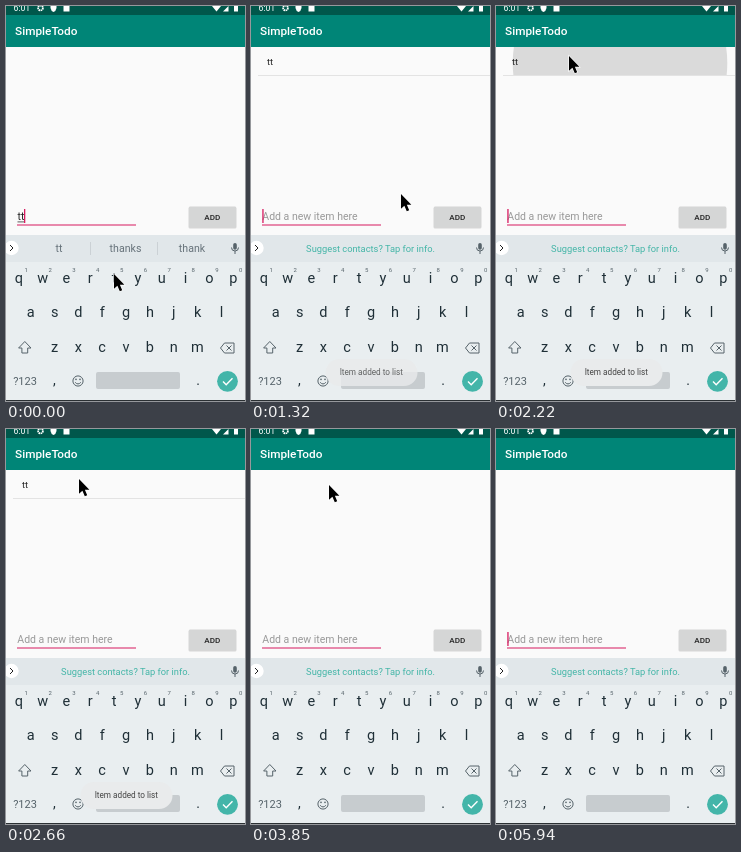
These frames come from a looping animation (239 px wide and 395 px high, 6240 ms). An HTML page:

```html
<!DOCTYPE html>
<html lang="en">
<head>
<meta charset="utf-8">
<title>Todo list</title>
<style>
  html, body { margin: 0; width: 100%; height: 100%; overflow: hidden; background: #fafafa; }
  svg { display: block; width: 100%; height: 100%; font-family: Roboto, sans-serif; }
  .mid { text-anchor: middle; }
  .line { fill: none; stroke: #56636a; stroke-width: 1; }
</style>
</head>
<body>
<svg viewBox="0 0 239 395">
  <defs>
    <clipPath id="rowClip"><rect x="7" y="41" width="232" height="29"/></clipPath>
  </defs>
  <rect width="239" height="395" fill="#fafafa"/>

  <!-- list row -->
  <g id="row">
    <circle id="ripple" cx="124" cy="57" fill="#dadada" clip-path="url(#rowClip)"/>
    <path d="M7 69.5H239" stroke="#e3e3e3"/>
    <text x="16" y="59" font-size="9.3" fill="#212121">tt</text>
  </g>

  <!-- status and title bars -->
  <rect y="9" width="239" height="32" fill="#008577"/>
  <rect width="239" height="9" fill="#00574b"/>
  <g fill="#fff">
    <text x="7.5" y="5" font-size="8.7">6:01</text>
    <circle cx="34.5" cy="2" r="2.4" fill="none" stroke="#fff" stroke-width="1.8" stroke-dasharray="1.4 .5"/>
    <path d="M44.5 0H50.5V2Q50 5 47.5 6Q45 5 44.5 2Z"/>
    <path d="M57.5 0H63.5V5.5H57.5Z"/>
    <path d="M206 0H215L210.5 5.5Z"/>
    <path d="M217 5.5L222.5 0V5.5Z"/>
    <path d="M228 0H232V5.5H228Z"/>
    <text x="9" y="29.2" font-size="11.8" font-weight="500">SimpleTodo</text>
  </g>

  <!-- input and button -->
  <path d="M11 219H130" stroke="#d81b60" stroke-width="1.2"/>
  <g id="typed">
    <text x="11.5" y="214.3" font-size="10.5" fill="#212121">tt</text>
    <path d="M11.5 215.9H18.3" stroke="#333" stroke-width=".8"/>
  </g>
  <text id="hint" x="11.3" y="214.3" font-size="10.5" fill="#999">Add a new item here</text>
  <rect id="caret" y="203" width="1.3" height="14" fill="#d81b60"/>
  <rect x="182.5" y="201" width="48" height="21.6" rx="1.5" opacity=".14"/>
  <rect id="button" x="183" y="200.6" width="47" height="21" rx="1"/>
  <text class="mid" x="206.3" y="214" font-size="8.1" font-weight="500" fill="#212121">ADD</text>

  <!-- keyboard -->
  <rect y="229" width="239" height="166" fill="#e9eef0"/>
  <rect y="229" width="239" height="27" fill="#e1e7ea"/>
  <circle cx="5.5" cy="242" r="7.2" fill="#fff"/>
  <path d="M4 239L7 242L4 245" class="line" style="stroke:#222"/>
  <g id="words" class="mid" font-size="10.6" fill="#66727a">
    <text x="53" y="246">tt</text>
    <text x="119.5" y="246">thanks</text>
    <text x="186" y="246">thank</text>
    <path d="M84.5 236V249M151.5 236V249" stroke="#cbd1d5"/>
  </g>
  <text id="suggest" class="mid" x="119.5" y="245.8" font-size="9.3" fill="#43b5a7">Suggest contacts? Tap for info.</text>
  <rect x="227.2" y="237" width="3.6" height="6.8" rx="1.8" fill="#56636a"/>
  <path d="M225.5 241.5A3.5 3.5 0 0 0 232.5 241.5M229 245V248" class="line"/>
  <g id="keys" class="mid" fill="#1f2f37"></g>
  <path d="M18.8 335.5L25 342H21.7V347H15.9V342H12.6Z" class="line"/>
  <path d="M214.5 342L218.5 337H228V347H218.5ZM220.5 339.5L225.5 344.5M225.5 339.5L220.5 344.5" class="line"/>
  <circle cx="72" cy="375" r="5.1" class="line"/>
  <path d="M69.2 376.3Q72 379.6 74.8 376.3" class="line"/>
  <g fill="#56636a"><circle cx="70" cy="373.4" r=".8"/><circle cx="74" cy="373.4" r=".8"/></g>
  <rect x="90" y="366" width="84" height="17" rx="2" fill="#c7cccf"/>
  <circle cx="221.5" cy="375.3" r="10.4" fill="#43b5a9"/>
  <path d="M217 375.5L220.2 378.7L226.5 372.3" fill="none" stroke="#fff" stroke-width="1.4"/>
  <rect y="394" width="239" height="1" fill="#2b3033"/>

  <g id="toast">
    <rect x="74.5" y="353" width="92" height="27" rx="13.5" fill="#e9ebec"/>
    <text class="mid" x="120.3" y="369.3" font-size="8.2" fill="#444">Item added to list</text>
  </g>

  <path id="mouse" d="M0 0V14.8L3.4 11.7L5.8 17.3L8.2 16.2L5.9 10.8H10.4Z" fill="#000" stroke="#fff" stroke-width="1.2" paint-order="stroke"/>
</svg>
<script>
const LOOP = 6240, TICK = 148.5, LEAD = 20;
const ADDED = 1000, REMOVED = 3850, MOUSE_GONE = 4400;
const $ = id => document.getElementById(id);
const clamp = v => Math.min(1, Math.max(0, v));
const ease = v => v * v * (3 - 2 * v);
const set = (id, attributes) => {
  for (const name in attributes) $(id).setAttribute(name, attributes[name]);
};
const show = (id, on) => set(id, { visibility: on ? "visible" : "hidden" });

// Keyboard letters
const PITCH = 23.83;
const label = (text, x, y, size) => `<text x="${x}" y="${y}" font-size="${size}">${text}</text>`;
const letters = (chars, x, y, size = 14.5) =>
  [...chars].map((c, i) => label(c, x + i * PITCH, y, size)).join("");
$("keys").innerHTML =
  letters("qwertyuiop", 12.8, 277) + letters("asdfghjkl", 24.8, 311.1) + letters("zxcvbnm", 48.5, 346.2) +
  `<g fill="#56636a">${letters("1234567890", 20.3, 266, 6)}${label("?123", 19, 379, 11)}</g>` +
  label(",", 48.5, 379, 14) + label(".", 192, 379, 14);

const home = { x: 108, y: 268 };
const moves = [
  { from: 200, to: 740, x: 208, y: 207 },   // to the button
  { from: 1050, to: 1330, x: 150, y: 188 }, // and up to the new row
  { from: 1330, to: 1930, x: 73, y: 50 },
  { from: 2850, to: 2970, x: 78, y: 56 },
  { from: 4200, to: 4300, x: 97, y: 78 }
];

function mouseAt(t) {
  let { x, y } = home;
  for (const move of moves) {
    const part = ease(clamp((t - move.from) / (move.to - move.from)));
    x += (move.x - x) * part;
    y += (move.y - y) * part;
  }
  return [x, y];
}

function drawRipple(age) {
  set("ripple", {
    r: Math.min(125, 104 + age * .12),
    opacity: age < 0 ? 0 : clamp((440 - age) / 220)
  });
}

function draw(t) {
  const added = t >= ADDED;
  show("typed", !added);
  show("words", !added);
  show("hint", added);
  show("suggest", added);
  show("row", added && t < REMOVED);
  show("mouse", t < MOUSE_GONE);

  const pressed = t > 700 && !added;
  set("button", { fill: pressed ? "#cbcccc" : "#d5d6d6" });
  set("caret", { x: added ? 11.3 : 18, opacity: (t + 120) % 1000 < 500 ? 1 : 0 });
  set("toast", { opacity: clamp((t - 1160) / 220) * clamp((3250 - t) / 350) });
  set("mouse", { transform: `translate(${mouseAt(t)})` });
  drawRipple(t < 3540 ? t - 2200 : t - 3540);
}

// The screen refreshes in discrete ticks
const start = performance.now();
function frame() {
  const t = (performance.now() - start) % LOOP;
  draw(Math.floor((t + LEAD) / TICK) * TICK);
  requestAnimationFrame(frame);
}
frame();
</script>
</body>
</html>
```
